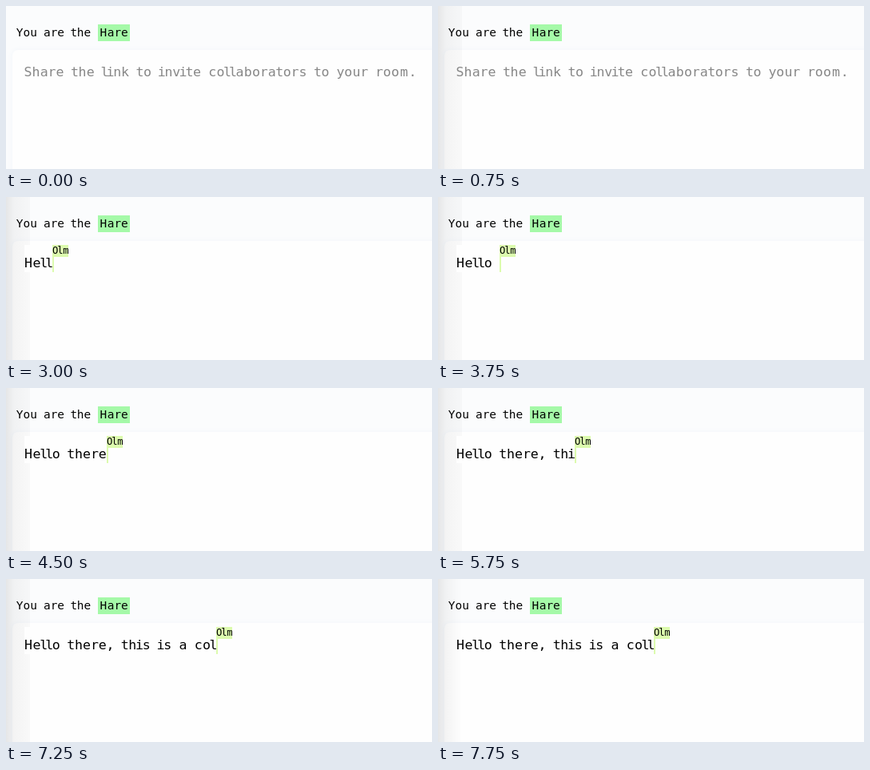
Recreate the animation shown at these times as an HTML page. Size 533 by 204 pixels, loop 8000 ms.

```html
<!DOCTYPE html>
<html lang="en">
<head>
<meta charset="utf-8">
<title>Shared room</title>
<style>
  html, body { margin: 0; width: 100%; height: 100%; overflow: hidden; background: #fbfcfd; }
  svg { display: block; width: 100vw; height: 100vh; }
  text { font-family: "DejaVu Sans Mono", "Noto Sans Mono", monospace; }
</style>
</head>
<body>
<svg viewBox="0 0 533 204">
  <defs>
    <linearGradient id="hardEdge">
      <stop offset="0" stop-opacity="0.085"/>
      <stop offset="0.35" stop-opacity="0.04"/>
      <stop offset="1" stop-opacity="0.02"/>
    </linearGradient>
    <linearGradient id="softEdge">
      <stop offset="0" stop-opacity="0.085"/>
      <stop offset="0.35" stop-opacity="0.04"/>
      <stop offset="1" stop-opacity="0"/>
    </linearGradient>
    <filter id="soft" x="-5%" y="-10%" width="110%" height="120%">
      <feGaussianBlur stdDeviation="3"/>
    </filter>
  </defs>

  <rect width="533" height="204" fill="#fbfcfd"/>
  <rect x="8" y="55" width="560" height="200" rx="7" fill="#f1f5fa" filter="url(#soft)"/>
  <rect x="8" y="55" width="560" height="200" rx="7" fill="#fefefe"/>
  <rect id="shade" width="30" height="204"/>
  <rect id="line" x="23" y="60" width="487" height="34" fill="#fefefe"/>

  <rect x="115" y="23" width="40" height="21" fill="#a5f9a8"/>
  <text id="intro" y="38"/>
  <text id="name" y="38"/>
  <text id="hint" y="87.5" fill="#878787"/>
  <text id="typed" y="87.5"/>
  <g id="cursor">
    <rect y="60" width="2" height="34" fill="#dcfbae"/>
    <rect y="60" width="20" height="15" fill="#dcfbae"/>
    <text id="tag" y="71"/>
  </g>
</svg>
<script>
const LOOP = 8000;
const SIZE = 16.6;
const MESSAGE = "Hello there, this is a coll";
// [time in ms, characters typed]
const STEPS = [
  [2250, 1], [2750, 2], [3000, 4], [3500, 5], [3750, 6], [4250, 9],
  [4500, 11], [4750, 12], [5000, 13], [5500, 14], [5750, 16], [6000, 18],
  [6250, 19], [6500, 21], [6750, 23], [7000, 25], [7250, 26], [7750, 27]
];
// The lettering is nearly monospaced, with a few narrower or wider characters.
const ADVANCE = {
  l: 7, i: 7.3, " ": 9.1, t: 8.9, r: 9.6, ",": 9.3, ".": 9.3,
  v: 9.2, k: 9.5, y: 9.4, m: 12, H: 11.2
};
const CELL = 10.15;
const GLYPH = SIZE * 0.602;

const el = id => document.getElementById(id);
const advance = c => ADVANCE[c] || CELL;
const widthOf = s => [...s].reduce((sum, c) => sum + advance(c), 0);

// Centres each glyph in its own advance.
function write(id, str, left, scale = 1) {
  const node = el(id);
  let x = left;
  const xs = [...str].map(c => {
    const at = x + (advance(c) - GLYPH) / 2 * scale;
    x += advance(c) * scale;
    return at.toFixed(2);
  });
  node.setAttribute("font-size", SIZE * scale);
  node.setAttribute("x", xs.join(" "));
  node.textContent = str;
}

function show(id, on) {
  el(id).setAttribute("visibility", on ? "visible" : "hidden");
}

let shown = -1;

function type(count) {
  if (count === shown) return;
  shown = count;
  const str = MESSAGE.slice(0, count);
  write("typed", str.trimEnd(), 22.3);
  el("cursor").setAttribute("transform", `translate(${Math.round(22.5 + widthOf(str))} 0)`);
}

function draw(t) {
  const count = STEPS.reduce((n, [at, chars]) => t >= at ? chars : n, 0);
  type(count);
  show("hint", !count);
  show("typed", count > 0);
  show("cursor", count > 0);
  show("line", count > 0 && t < 7500);
  show("shade", t >= 750);
  el("shade").setAttribute("fill", t < 7500 ? "url(#hardEdge)" : "url(#softEdge)");
}

write("intro", "You are the", 12.6, 0.87);
write("name", "Hare", 117, 0.87);
write("hint", "Share the link to invite collaborators to your room.", 22.3);
write("tag", "Olm", 0, 0.735);

const start = performance.now();
function tick() {
  draw((performance.now() - start) % LOOP);
  requestAnimationFrame(tick);
}
tick();
</script>
</body>
</html>
```
